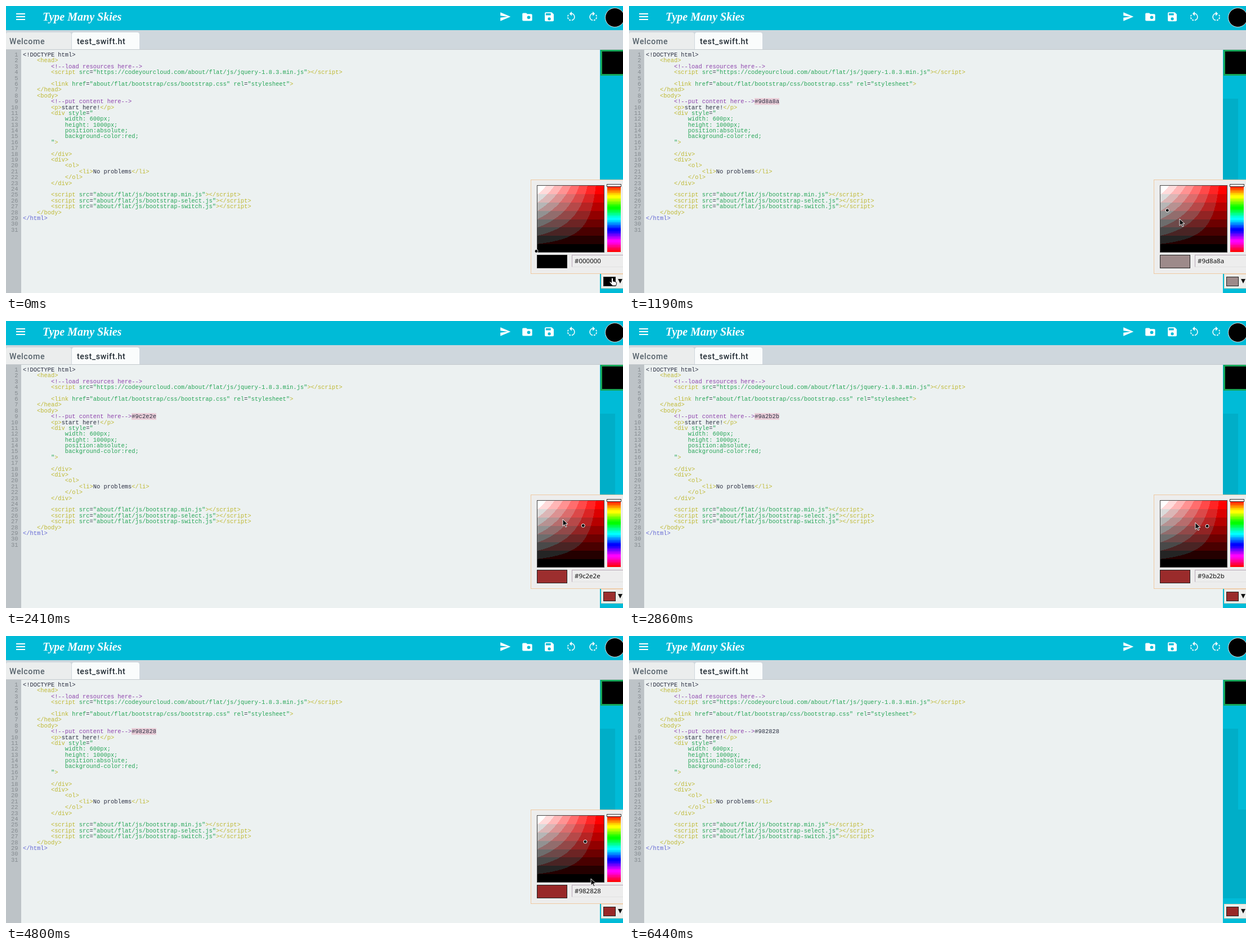
Recreate the animation shown at these times as an HTML page with a canvas. Size 1096 by 511 pixels, loop 6.73 s.

```html
<!DOCTYPE html>
<html lang="en">
<head>
<meta charset="utf-8">
<title>Code editor colour picker</title>
<style>
html, body { margin: 0; width: 1096px; height: 511px; overflow: hidden; }
body { position: relative; background: #ecf1f1; }
div, pre, canvas, #over { position: absolute; box-sizing: border-box; margin: 0; }
#over { left: 0; top: 0; }
#bar { width: 1096px; height: 43px; background: #00bbd7; }
#brand { left: 65px; top: 7px; color: #fff; font: italic bold 20px/25px "Liberation Serif", serif; white-space: nowrap; }
#tabs { top: 43px; width: 1096px; height: 35px; background: #cfd7dd; border-bottom: 1px solid #c3c9cd; }
.tab { top: 4px; height: 30px; border-radius: 4px 4px 0 0; font: 500 14.2px/33px Roboto, sans-serif; letter-spacing: .6px; }
#gutter { top: 78px; width: 27px; height: 433px; background: #bdc3c7; }
pre { top: 82px; font: 10.4px/10.383px "Liberation Mono", monospace; color: #2b2f42; }
#nums { width: 21.5px; text-align: right; color: #858b90; }
#code { left: 30px; }
.c { color: #8e44ad; } .s, .a { color: #27a658; } .t { color: #bfb934; } .h { color: #6468d4; }
#side { left: 1055px; top: 78px; width: 41px; height: 433px; background: #00bbd7; }
.shade { background: #00aec8; }
#thumb { left: 1px; width: 44px; height: 46px; background: #000; border: 3px solid #16a658; }
#button { left: 2px; top: 399px; width: 45px; height: 26px; background: #eeeeec; border: 1px solid #efd3b8; }
.swatch { border: 1px solid #222; }
#popup { left: 932px; top: 309px; width: 170px; height: 168px; background: #ededed; border: 1px solid #efc9a2; }
#field { left: 10px; top: 9px; border: 1px solid #444; }
#hue { left: 135px; top: 9px; }
#input { left: 72px; top: 133px; width: 96px; height: 22px; border: 1px solid #b5a5b5; border-bottom-color: #e2e2e2;
  padding-left: 4px; font: 11.5px/20px "Noto Sans", sans-serif; color: #111; }
</style>
</head>
<body>
<div id="bar"><div id="brand">Type Many Skies</div></div>
<div id="tabs">
  <div class="tab" style="width:116px;padding-left:6px;background:#ebeded;color:#56626b">Welcome</div>
  <div class="tab" style="left:117px;width:120px;padding-left:9px;background:#fafcfc;color:#232d35">test_swift.ht</div>
</div>
<div id="gutter"></div>
<pre id="nums"></pre>
<pre id="code"></pre>
<div id="side">
  <div id="shades">
    <div class="shade" style="top:87px;width:27px;height:144px"></div>
    <div class="shade" style="top:231px;width:41px;height:158px"></div>
  </div>
  <div id="thumb"></div>
  <div id="button">
    <div class="swatch" style="left:3px;top:4px;width:22px;height:17px"></div>
  </div>
</div>
<div id="popup">
  <canvas id="field" width="118" height="118"></canvas>
  <canvas id="hue" width="24" height="119"></canvas>
  <div style="left:134px;top:7px;width:26px;height:5px;background:#fff;border:1px solid #333"></div>
  <div class="swatch" style="left:10px;top:133px;width:54px;height:24px"></div>
  <div id="input"></div>
</div>
<svg id="over" width="1096" height="511">
  <g fill="#fff">
    <path d="M18 13h16v2h-16zM18 18h16v2h-16zM18 23h16v2h-16z"/>
    <path transform="translate(876.5 8.7) scale(.86)" d="M2 21 23 12 2 3v7l15 2-15 2z"/>
    <g transform="translate(915.5 9) scale(.87)">
      <path d="M10 4H4c-1.1 0-2 .9-2 2v12c0 1.1.9 2 2 2h16c1.1 0 2-.9 2-2V8c0-1.1-.9-2-2-2h-8z"/>
      <circle cx="15" cy="13" r="3.3" fill="#00bbd7"/>
    </g>
    <path transform="translate(954.5 8.7) scale(.88)" d="M17 3H5c-1.1 0-2 .9-2 2v14c0 1.1.9 2 2 2h14c1.1 0 2-.9 2-2V7zm-5 16a3 3 0 1 1 0-6 3 3 0 0 1 0 6zm3-10H5V5h10z"/>
    <path id="turn" transform="translate(993.5 9) scale(.87)" d="M7.1 8.5 5.7 7.1C4.8 8.3 4.2 9.6 4.1 11h2c.1-.9.5-1.7 1-2.5zM6.1 13h-2c.2 1.4.7 2.7 1.6 3.9l1.4-1.4c-.5-.8-.9-1.6-1-2.5zm1 5.3c1.2.9 2.5 1.4 3.9 1.6v-2c-.9-.1-1.7-.5-2.5-1zM13 4.1V1L8.5 5.5 13 10V6.1a6 6 0 0 1 0 11.8v2a8 8 0 0 0 0-15.8z"/>
    <use href="#turn" transform="translate(2047 0) scale(-1 1)"/>
  </g>
  <circle cx="1081.5" cy="20.5" r="17" fill="#000" stroke="#dfe8ea"/>
  <path d="M1087 486h8l-4 8z" fill="#111"/>
  <circle id="dot" r="3" fill="#000" stroke="#fff"/>
  <g id="cursor">
    <path id="arrow" d="M0 0v12l3-2.6 2 4.6 2-.9-2-4.4h4z" fill="#111" stroke="#fff" stroke-width=".9"/>
    <path id="hand" d="M-1.5 1q1.5-2 3 0v5l4.5 1.2q2 .6 1.5 3L6.500 14h-6L-5 8q0-2 2-1l1.500 1.500z" fill="#fff" stroke="#111"/>
  </g>
</svg>
<script>
const $ = id => document.getElementById(id);

// ‹ and › stand for angle brackets, @ for the inserted colour
const source = `‹!DOCTYPE html›
    ‹head›
        ‹!--load resources here--›
        ‹script src="https://codeyourcloud.com/about/flat/js/jquery-1.8.3.min.js"›‹/script›

        ‹link href="about/flat/bootstrap/css/bootstrap.css" rel="stylesheet"›
    ‹/head›
    ‹body›
        ‹!--put content here--›@
        ‹p›start here!‹/p›
        ‹div style="
            width: 600px;
            height: 1000px;
            position:absolute;
            background-color:red;
        "›

        ‹/div›
        ‹div›
            ‹ol›
                ‹li›No problems‹/li›
            ‹/ol›
        ‹/div›

        ‹script src="about/flat/js/bootstrap.min.js"›‹/script›
        ‹script src="about/flat/js/bootstrap-select.js"›‹/script›
        ‹script src="about/flat/js/bootstrap-switch.js"›‹/script›
    ‹/body›
‹/html›`;
const token = /‹!D.*›|(‹!--.*?--›)|("[^"]*")|(‹\/html›)|(‹\/?\w+|›)|(\w+(?=="))/g;
$('code').innerHTML = source
  .replace(token, (text, ...groups) => {
    const kind = groups.slice(0, 5).findIndex(Boolean);
    return kind < 0 ? text : `<span class=${'cshta'[kind]}>${text}</span>`;
  })
  .replace(/‹/g, '&lt;').replace(/›/g, '&gt;')
  .replace('@', '<span id=pick></span>');
$('nums').textContent = Array.from({ length: 31 }, (_, i) => i + 1).join('\n');

// Colours are shown in eight levels per channel
const level = v => Math.min(7, Math.floor(v * 8)) * 255 / 7;
const rgb = (r, g, b) => `rgb(${r},${g},${b})`;
const clamp = v => Math.max(0, Math.min(1, v));

const field = $('field').getContext('2d');
for (let y = 0; y < 118; y++) for (let x = 0; x < 118; x++) {
  const v = 1 - y / 118, g = level(v * (1 - x / 118));
  field.fillStyle = rgb(level(v), g, g);
  field.fillRect(x, y, 1, 1);
}
const hue = $('hue').getContext('2d');
for (let y = 0; y < 119; y++) {
  const h = y / 119 * 6;
  hue.fillStyle = rgb(level(clamp(Math.abs(h - 3) - 1)),
    level(clamp(2 - Math.abs(h - 2))), level(clamp(2 - Math.abs(h - 4))));
  hue.fillRect(0, y, 24, 1);
}

const LOOP = 6730, PICK = 600, BLUR = 5400, LEAVE = 5990, CLOSE = 6140;
// Start, end and number of steps of each burst of movement
const bursts = [[0, 0, 1], [150, 1190, 8], [1340, 2230, 7], [2410, 3450, 8], [4800, 4950, 2], [5400, 6440, 8]];
// Time, red, green (blue equals green)
const tones = [[PICK, 0, 0], [1040, 171, 149], [1190, 157, 138], [1780, 212, 153], [2410, 156, 46], [3450, 152, 40]];
// Time and pointer tip
const moves = [[0, 1077, 484], [150, 1077, 484], [600, 1000, 425], [1190, 978, 379], [1780, 962, 375],
  [2410, 989, 353], [3450, 1029, 367], [4650, 1029, 367], [4950, 1049, 497]];

function snap(t) {
  const [a, b, n] = bursts.filter(s => s[0] <= t).pop();
  const step = (b - a) / (n - 1) || 1;
  const k = Math.min(n - 1, Math.floor((t - a + 8) / step));
  return Math.floor((a + k * step + 1) / 10) * 10;
}

function at(keys, t) {
  const i = keys.findIndex(k => k[0] > t);
  if (i < 0) return keys[keys.length - 1].slice(1);
  if (i === 0) return keys[0].slice(1);
  const p = keys[i - 1], q = keys[i], f = (t - p[0]) / (q[0] - p[0]);
  return [1, 2].map(j => p[j] + (q[j] - p[j]) * f);
}

const show = (id, on) => { $(id).style.display = on ? '' : 'none'; };

function draw(now) {
  const t = snap(now % LOOP);
  const [r, g] = at(tones, t).map(Math.round);
  const hex = '#' + [r, g, g].map(v => v.toString(16).padStart(2, '0')).join('');
  const picked = r > 0;

  $('pick').textContent = picked ? hex : '';
  $('pick').style.background = t < BLUR ? '#ebcfd9' : 'none';
  $('input').textContent = hex;
  document.querySelectorAll('.swatch').forEach(s => { s.style.background = hex; });
  $('dot').setAttribute('cx', 942 + 118 * (picked ? 1 - g / r : 0));
  $('dot').setAttribute('cy', 318.5 + 118 * (1 - r / 255));

  const hand = t < 300 || t === 3450;
  $('cursor').setAttribute('transform', `translate(${at(moves, t)})`);
  show('hand', hand);
  show('arrow', !hand);
  show('cursor', t < LEAVE);
  show('popup', t < CLOSE);
  show('dot', t < CLOSE);
  show('shades', picked);
  requestAnimationFrame(draw);
}
draw(performance.now());
</script>
</body>
</html>
```
